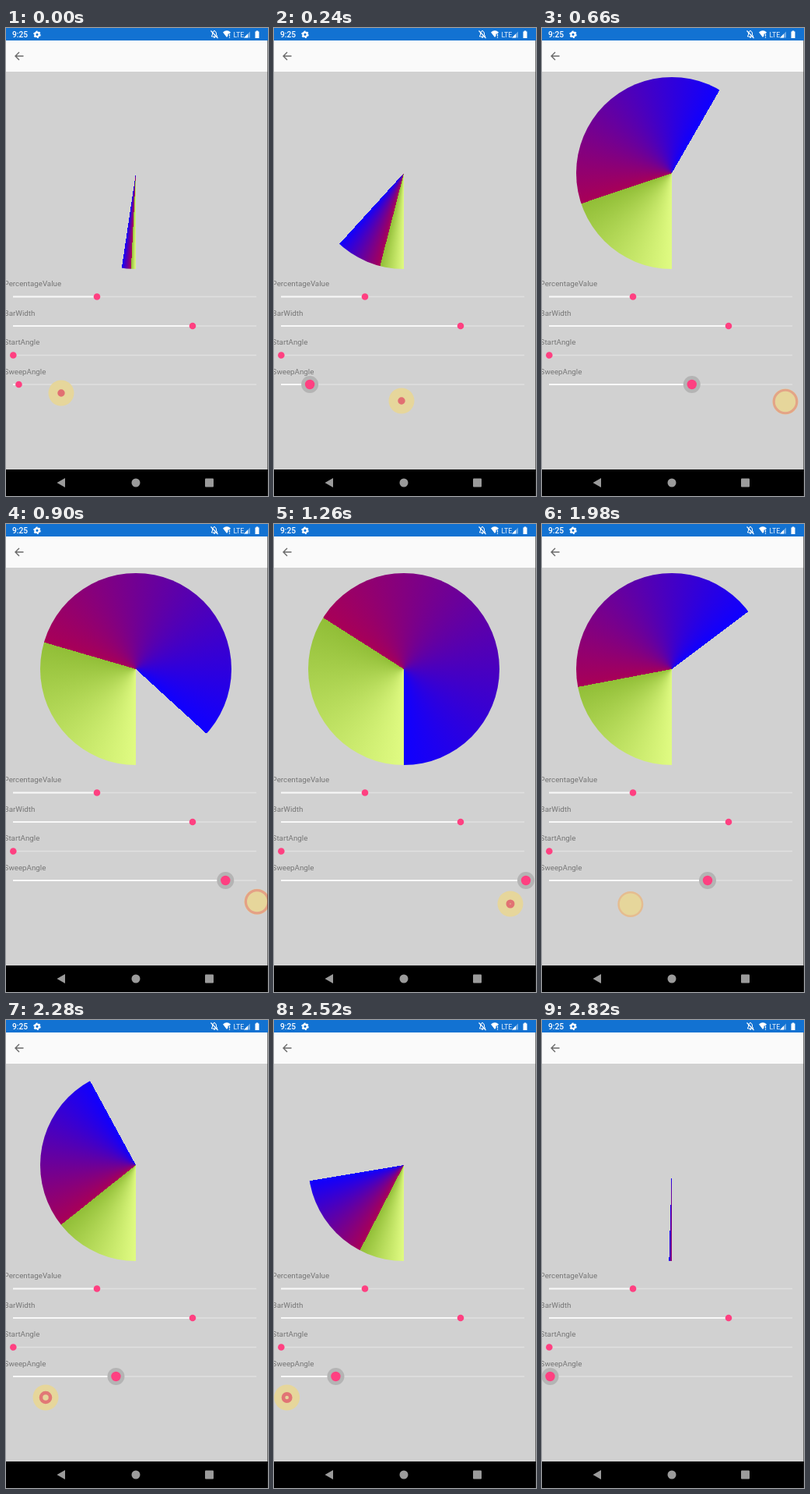
An HTML page for the animation above (2880 ms loop, 337x600 px).

```html
<!DOCTYPE html>
<html lang="en">
<head>
<meta charset="utf-8">
<title>Sweep angle slider</title>
<style>
  html, body { margin: 0; width: 100%; height: 100%; overflow: hidden; background: #d1d1d1; }
  #stage { position: absolute; left: 0; top: 0; width: 337px; height: 600px; overflow: hidden; background: #d1d1d1; }
  #dial {
    --sweep: 8.5; --part: .34;
    --end: calc(var(--sweep) * 1deg);
    --split: calc(var(--end) * var(--part));
    position: absolute; left: 44px; top: 63px; width: 246px; height: 246px; border-radius: 50%;
    background: conic-gradient(from 180deg,
      #e0fb82 0deg, #91be37 var(--split),
      #a80057 var(--split), #0f00ff var(--end),
      transparent var(--end));
  }
  svg { position: absolute; left: 0; top: 0; }
  text { font-family: Roboto, "Open Sans", sans-serif; }
  .label { font-size: 9.75px; fill: #757575; }
  .status { fill: #fff; }
  .track { stroke: #e0e0e0; stroke-width: 1.5; }
  .fill { stroke: #f8f8f8; stroke-width: 2; }
  .thumb { fill: #ff4081; }
</style>
</head>
<body>
<div id="stage">
  <div id="dial"></div>
  <svg width="337" height="600" viewBox="0 0 337 600">
    <rect width="337" height="16" fill="#1272d2"/>
    <rect y="16" width="337" height="40" fill="#fafafa"/>

    <g class="status">
      <text x="8" y="12" font-size="10.2" font-weight="500">9:25</text>
      <circle cx="40" cy="8.3" r="2.7" fill="none" stroke="#fff" stroke-width="2.2"/>
      <circle cx="40" cy="8.3" r="4.1" fill="none" stroke="#fff" stroke-width="1.4" stroke-dasharray="2.15 2.14"/>
      <path d="M264.5 11h7v-1l-1-1V7q0-2.4-2-2.8V3.500h-1v.7q-2 .4-2 2.800v2l-1 1zM267 11.600h2q-1 1.800-2 0z" fill="none" stroke="#fff"/>
      <path d="M263.500 3.500l9 9.500" stroke="#fff" stroke-width="1.200"/>
      <path d="M279 5.500q5-4.500 10 0l-1.500 2h-2v2.500l-1.500 2z"/>
      <path d="M287.500 8v2.500M287.500 11.500v1.200" stroke="#fff" stroke-width="1.200"/>
      <text x="292.500" y="12" font-size="8.800" opacity=".9">LTE</text>
      <path d="M306 12.500l8-8v8z" opacity=".4"/>
      <path d="M306 12.500l5-5v5z"/>
      <path d="M320.500 4.500h1.200v-1h2.600v1h1.200v8.500h-5z"/>
    </g>
    <path d="M22.500 36h-10M17 31l-5 5 5 5" fill="none" stroke="#696969" stroke-width="1.400"/>

    <g id="sliders"></g>

    <g id="touch">
      <circle r="16.500" fill="#e6d69b"/>
      <circle id="ring" fill="none" stroke="#e0646e"/>
    </g>

    <rect y="566" width="337" height="34"/>
    <g fill="#9b9b9b">
      <path d="M65.500 583l10.500-6v12z"/>
      <circle cx="167" cy="583" r="5.500"/>
      <rect x="256" y="577.500" width="11" height="11" rx="1"/>
    </g>
    <rect x="336" y="16" width="1" height="584" fill="#222" opacity=".6"/>
  </svg>
</div>
<script>
const LOOP = 2880, STEP = 60, LEFT = 9, SPAN = 315;
const RIPPLE = 250, RIPPLE_START = 240, RELEASE = 2640;

// [time, sweep in degrees]
const sweepKeys = [[0, 8.5], [240, 42.4], [660, 210], [990, 342], [1080, 360], [1440, 360],
  [1680, 332], [2080, 200], [2280, 151.4], [2640, 46], [2820, 1.7]];
// [time, x, y]
const touchKeys = [[0, 71, 468], [240, 164, 478], [660, 313, 479], [840, 323, 483], [1080, 322, 487],
  [1260, 304, 487], [1680, 184, 491], [2280, 51, 484], [2460, 18, 484], [2640, 15, 484]];

const $ = id => document.getElementById(id);

function setAttrs(el, attrs) {
  for (const name in attrs) el.setAttribute(name, attrs[name]);
}

function add(parent, tag, attrs, text) {
  const el = document.createElementNS("http://www.w3.org/2000/svg", tag);
  setAttrs(el, attrs);
  if (text) el.textContent = text;
  parent.appendChild(el);
  return el;
}

function addSlider(name, y, x) {
  const box = $("sliders");
  add(box, "text", { class: "label", x: -2.4, y: y - 13.4 }, name);
  add(box, "line", { class: "track", x1: LEFT, x2: 322, y1: y, y2: y });
  return {
    fill: add(box, "line", { class: "fill", x1: LEFT, x2: x, y1: y, y2: y }),
    halo: add(box, "circle", { cx: x, cy: y, r: 0, fill: "#b4b4b4" }),
    thumb: add(box, "circle", { class: "thumb", cx: x, cy: y, r: 4.3 })
  };
}

// Smooth curve through the keys that never overshoots them
function sample(keys, t, col = 1) {
  const last = keys.length - 1;
  if (t >= keys[last][0]) return keys[last][col];
  const slope = i => (keys[i + 1][col] - keys[i][col]) / (keys[i + 1][0] - keys[i][0]);
  const tangent = i => {
    if (i === 0) return slope(0);
    if (i === last) return slope(last - 1);
    const a = slope(i - 1), b = slope(i);
    return a * b > 0 ? 2 * a * b / (a + b) : 0;
  };
  let i = 0;
  while (t >= keys[i + 1][0]) i++;
  const h = keys[i + 1][0] - keys[i][0], u = (t - keys[i][0]) / h, v = 1 - u;
  return keys[i][col] * v * v * (1 + 2 * u) + keys[i + 1][col] * u * u * (3 - 2 * u)
    + h * u * v * (v * tangent(i) - u * tangent(i + 1));
}

addSlider("PercentageValue", 344.5, 117);
addSlider("BarWidth", 382, 240);
addSlider("StartAngle", 419.5, 9.3);
const sweepSlider = addSlider("SweepAngle", 457, 16.5);

function drawTouch(t) {
  $("touch").style.display = t < RELEASE ? "" : "none";
  $("touch").setAttribute("transform", `translate(${sample(touchKeys, t)} ${sample(touchKeys, t, 2)})`);
  const phase = (t - RIPPLE_START + RIPPLE) % RIPPLE / RIPPLE;
  const q = Math.max(0, phase - .06) / .94;
  setAttrs($("ring"), {
    r: 2.3 + 13 * (1 - (1 - q) ** 3),
    "stroke-width": 4.8 - 2.5 * q,
    "stroke-opacity": .9 - .7 * q
  });
}

function draw(now) {
  const t = Math.floor(now % LOOP / STEP) * STEP;
  const sweep = sample(sweepKeys, t);
  const x = LEFT + SPAN * sweep / 360;
  const pressed = t > 0;

  $("dial").style.setProperty("--sweep", sweep);
  $("dial").style.setProperty("--part", sweep < 3 ? 0 : .34);
  sweepSlider.fill.setAttribute("x2", x);
  setAttrs(sweepSlider.halo, { cx: x, r: pressed ? 11 : 0 });
  setAttrs(sweepSlider.thumb, { cx: x, r: pressed ? 6.2 : 4.3 });
  drawTouch(t);
}

const start = performance.now();
function tick() {
  draw(performance.now() - start);
  requestAnimationFrame(tick);
}
tick();
</script>
</body>
</html>
```
